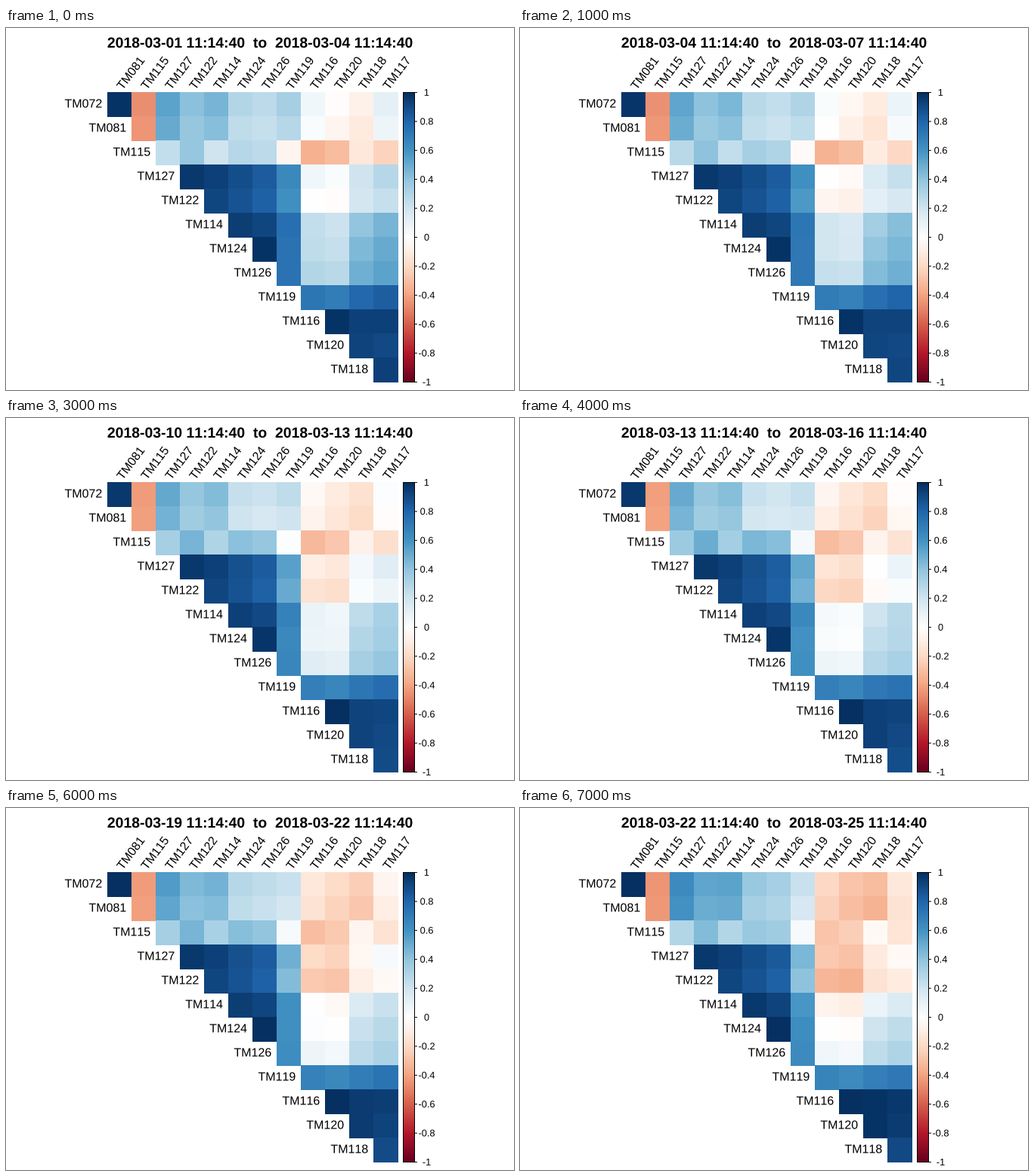
Recreate the animation shown at these times as a matplotlib script. Size 672 by 480 pixels, loop 8 s.

```python
import numpy as np
import matplotlib.pyplot as plt
from matplotlib.animation import FuncAnimation
from matplotlib.colors import LinearSegmentedColormap
from matplotlib.patches import PathPatch, Rectangle
from matplotlib.textpath import TextPath
from matplotlib.transforms import Affine2D

W, H, DPI = 672, 480, 96
LEFT, TOP, CELL, N = 134, 85, 32, 12
SPAN = N * CELL
STEPS = 8

plt.rcParams["text.kerning_factor"] = 6

CMAP = LinearSegmentedColormap.from_list("rdbu", [
    "#67001F", "#B2182B", "#D6604D", "#F4A582", "#FDDBC7", "#FFFFFF",
    "#D1E5F0", "#92C5DE", "#4393C3", "#2166AC", "#053061"], N=200)

# Each sensor is a vector; the correlation of two sensors is their dot product
SENSORS = {
    "TM072": (.06, .41, .92, 0),
    "TM081": (.02, .38, .90, 0),
    "TM115": (-.36, .38, -.65, 0),
    "TM127": (.06, .96, .15, .12),
    "TM122": (0, 1, 0, 0),
    "TM114": (.24, .91, .08, .25),
    "TM124": (.25, .86, -.08, .45),
    "TM126": (.29, .81, -.09, .47),
    "TM119": (.72, .61, .04, .10),
    "TM116": (1, 0, 0, 0),
    "TM120": (.98, -.02, -.07, 0),
    "TM118": (.93, .18, -.22, .10),
    "TM117": (.93, .23, -.04, .16),
}
NAMES = list(SENSORS)
START = np.array(list(SENSORS.values()))

# Sensors that move together: first one, count, early drift, late drift
DRIFTS = [
    ("TM072", 2, (-.04, -.03, 0, 0), (-.05, .14, 0, 0)),
    ("TM115", 1, (.15, .11, 0, 0), (.07, -.06, -.08, 0)),
    ("TM124", 2, (-.04, 0, -.04, 0), (.09, 0, .05, 0)),
    ("TM119", 1, (.06, -.14, 0, 0), (.02, -.07, 0, 0)),
    ("TM116", 4, (0, -.21, 0, 0), (0, -.13, 0, 0)),
]


def correlations(step):
    early = min(step / 4, 1)
    late = max((step - 4) / 3, 0) ** 2
    vectors = START.copy()
    for first, count, a, b in DRIFTS:
        i = NAMES.index(first)
        vectors[i:i + count] += early * np.array(a) + late * np.array(b)
    return np.clip(vectors @ vectors.T, -1, 1)


def outline(s, size, x, y, align=0, angle=0, weight="normal"):
    """Glyph path with its ink aligned to x (0 left, .5 centre, 1 right)."""
    path = TextPath((0, 0), s, size=size,
                    prop={"family": "Liberation Sans", "weight": weight})
    box = path.get_extents()
    move = (Affine2D().translate(-box.x0 - align * box.width, 0)
            .rotate_deg(angle).scale(1, -1).translate(x, y))
    return move.transform_path(path)


def write(*args, **kw):
    return ax.add_patch(PathPatch(outline(*args, **kw), fc="black", lw=0))


def title_path(step):
    day = 1 + 3 * step
    first, last = (f"2018-03-{d:02d} 11:14:40" for d in (day, day + 3))
    return outline(f"{first}  to  {last}", 19.4, W / 2, 26, .5, weight="bold")


fig = plt.figure(figsize=(W / DPI, H / DPI), dpi=DPI, facecolor="white")
ax = fig.add_axes([0, 0, 1, 1])
ax.axis("off")

# Cells overlap by one pixel, so the outer edge keeps its border
cells = {}
for r in range(N):
    for c in range(r, N):
        cells[r, c + 1] = ax.add_patch(Rectangle(
            (LEFT + c * CELL, TOP + r * CELL), CELL + 1, CELL + 1,
            lw=0, antialiased=False))

# Colour bar
ax.imshow(np.linspace(1, -1, 200)[:, None], cmap=CMAP, vmin=-1, vmax=1,
          extent=(525, 541, TOP + SPAN + 1, TOP), interpolation="nearest",
          aspect="auto")
ax.add_patch(Rectangle((525.5, TOP + .5), 15, SPAN, fill=False, ec="black",
                       lw=.75, snap=False))
for k in range(11):
    y = TOP + .5 + k * SPAN / 10
    ax.plot([541, 544], [y, y], color="black", lw=.75, snap=False,
            solid_capstyle="butt")
    write(f"{(5 - k) / 5:g}", 12.8, 556.5, y + 4.3, .5)

for k in range(N):
    write(NAMES[k], 16, LEFT - 7.5 + k * CELL, TOP + 20.5 + k * CELL, 1)
    write(NAMES[k + 1], 16, LEFT + 20.5 + k * CELL, TOP - 2.5, angle=53)

title = ax.add_patch(PathPatch(title_path(0), fc="black", lw=0))
ax.set_xlim(0, W)
ax.set_ylim(H, 0)


def update(step):
    corr = correlations(step)
    for pair, cell in cells.items():
        cell.set_facecolor(CMAP((corr[pair] + 1) / 2))
    title.set_path(title_path(step))
    return [title, *cells.values()]


anim = FuncAnimation(fig, update, frames=STEPS, interval=1000, repeat=True,
                     repeat_delay=0, blit=False)
plt.show()
```
